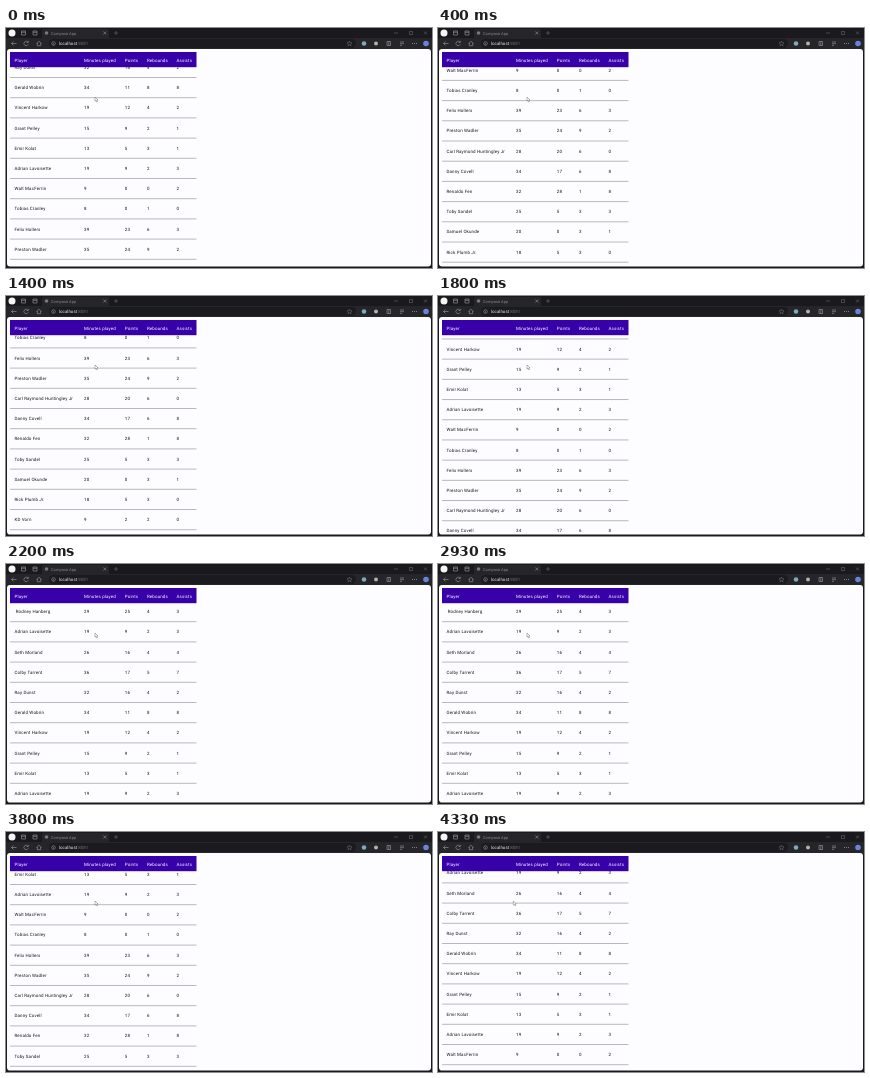
An HTML page for the animation above (4390 ms loop, 426 px wide and 240 px high).

```html
<!DOCTYPE html>
<html lang="en">
<head>
<meta charset="utf-8">
<title>Player table</title>
<style>
  html, body { margin: 0; width: 100%; height: 100%; overflow: hidden; background: #1a1a1e; }
  svg { display: block; width: 100vw; height: 100vh; }
  text { font: 4.45px Roboto, sans-serif; letter-spacing: .14px; text-rendering: geometricPrecision; white-space: pre; }
  .icon { fill: none; stroke: #9c9ca2; stroke-width: .6; }
  .dim { stroke: #66666c; }
</style>
</head>
<body>
<svg viewBox="0 0 426 240">
  <defs><clipPath id="view"><rect x="1" y="24" width="424" height="214"/></clipPath></defs>

  <!-- browser window -->
  <rect width="426" height="240" fill="#1a1a1e"/>
  <path d="M36 10.500V3q0-2 2-2h63q2 0 2 2v7.500z" fill="#25252a"/>
  <rect y="10" width="426" height="12" fill="#25252a"/>
  <rect x="43" y="11" width="307" height="9" rx="4.500" fill="#1b1b1f"/>
  <circle cx="6" cy="5" r="3.500" fill="#f4f4f4"/>
  <circle cx="40.500" cy="5" r="1.800" fill="#708078"/>
  <g class="icon">
    <path d="M15.500 3h4v4h-4zM15.500 4.300h4M27 3h4v4h-4zM27 4.300h4"/>
    <path d="M97.300 3.500l3 3m0-3l-3 3"/>
    <path class="dim" d="M108 5h4m-2-2v4M388 5h4M403.500 3.500h3v3h-3zM418 3.500l3 3m0-3l-3 3"/>
    <path d="M10.500 15.500h-5m2-2l-2 2l2 2M22 14.300a2.200 2.200 0 1 0 .2 2M22.300 12.800v1.700h-1.700"/>
    <path d="M30.500 15.500l2.500-2.200l2.500 2.200M31.300 15v2.700h3.400v-2.700"/>
    <circle cx="47.500" cy="15.500" r="1.800"/>
    <path d="M47.500 15.200v1.200"/>
    <path class="dim" d="M343.500 13l.7 1.700l1.800.1l-1.400 1.200l.5 1.800l-1.600-1l-1.600 1l.5-1.800l-1.400-1.200l1.800-.1z"/>
    <path d="M381 13.500h3.500v4h-3.500zM382.800 13.500v4M394 14h4m-4 1.700h4m-4 1.700h2"/>
  </g>
  <circle cx="358" cy="15.500" r="2.300" fill="#7fa9bd"/>
  <circle cx="370" cy="15.500" r="2" fill="#a9b8a4"/>
  <g fill="#9c9ca2">
    <circle cx="406.500" cy="15.500" r=".5"/><circle cx="408.500" cy="15.500" r=".5"/><circle cx="410.500" cy="15.500" r=".5"/>
  </g>
  <circle cx="420" cy="15.500" r="2.800" fill="#6a83d8"/>
  <text x="45" y="6.500" fill="#8a8a90" style="font-size:4px;letter-spacing:0">Compose App</text>
  <text x="53" y="17" fill="#ececec" style="letter-spacing:0">localhost<tspan fill="#6c6c72">:8081</tspan></text>

  <!-- page -->
  <rect x="1" y="21" width="424" height="217.500" rx="3" fill="#fdfcfe"/>
  <g clip-path="url(#view)"><g id="rows" fill="#151518"></g></g>
  <rect x="4" y="24" width="186.500" height="15.200" fill="#3800a8"/>
  <g id="head" fill="#fff"></g>
  <path id="cursor" d="M0 0v4.200l1-.9l.7 1.500l.7-.3l-.7-1.500h1.300z" fill="#fff" stroke="#555" stroke-width=".4"/>
</svg>
<script>
const $ = id => document.getElementById(id);
const columns = [8.5, 78, 118.8, 141, 170.5];
const firstRow = 47.5, pitch = 20.2, loop = 4390, fps = 15;

const players = [
  [' Rodney Hanberg', 29, 25, 4, 3], ['Adrian Lavoisette', 19, 9, 2, 3],
  ['Seth Morland', 26, 16, 4, 4], ['Colby Tarrent', 36, 17, 5, 7],
  ['Ray Dunst', 32, 16, 4, 2], ['Gerald Wobrin', 34, 11, 8, 8],
  ['Vincent Harkow', 19, 12, 4, 2], ['Grant Pelley', 15, 9, 2, 1],
  ['Emir Kolat', 13, 5, 3, 1], ['Adrian Lavoisette', 19, 9, 2, 3],
  ['Walt MacFerrin', 9, 0, 0, 2], ['Tobias Cranley', 8, 0, 1, 0],
  ['Felix Hollers', 39, 23, 6, 3], ['Preston Wadler', 35, 24, 9, 2],
  ['Carl Raymond Huntingley Jr', 28, 20, 6, 0], ['Danny Covell', 34, 17, 6, 8],
  ['Renaldo Fen', 32, 28, 1, 8], ['Toby Sandel', 25, 5, 3, 3],
  ['Samuel Okunde', 20, 0, 3, 1], ['Rick Plumb Jr.', 18, 5, 3, 0],
  ['KD Vorn', 9, 2, 2, 0]
];

const cells = (values, y) =>
  values.map((v, i) => `<text x="${columns[i]}" y="${y + 1.6}">${v}</text>`).join('');

$('head').innerHTML = cells(['Player', 'Minutes played', 'Points', 'Rebounds', 'Assists'], 32);
$('rows').innerHTML = players.map((p, i) => {
  const y = firstRow + i * pitch;
  return cells(p, y) + `<path d="M4 ${y + 10.2}H190.5" stroke="#a9a8ae" stroke-width=".8"/>`;
}).join('');

// [time, value] pairs, linear in between
const scrollKeys = [[0, 89], [470, 228], [1480, 228], [2130, 0], [2980, 0],
  [3470, 228], [3640, 228], [3800, 166.8], [4330, 27]];
const cursorKeys = [[0, 89], [4050, 89], [4330, 75.3]];

function valueAt(keys, t) {
  const i = keys.findIndex(k => k[0] > t);
  if (i < 0) return keys[keys.length - 1][1];
  const [t0, a] = keys[i - 1], [t1, b] = keys[i];
  return a + (b - a) * (t - t0) / (t1 - t0);
}

const start = performance.now();
function draw() {
  const elapsed = (performance.now() - start) % loop;
  const t = Math.floor((elapsed + 5) * fps / 1000) * 1000 / fps;
  $('rows').setAttribute('transform', `translate(0 ${-valueAt(scrollKeys, t)})`);
  $('cursor').setAttribute('transform', `translate(${valueAt(cursorKeys, t)} 69)`);
  requestAnimationFrame(draw);
}
draw();
</script>
</body>
</html>
```
